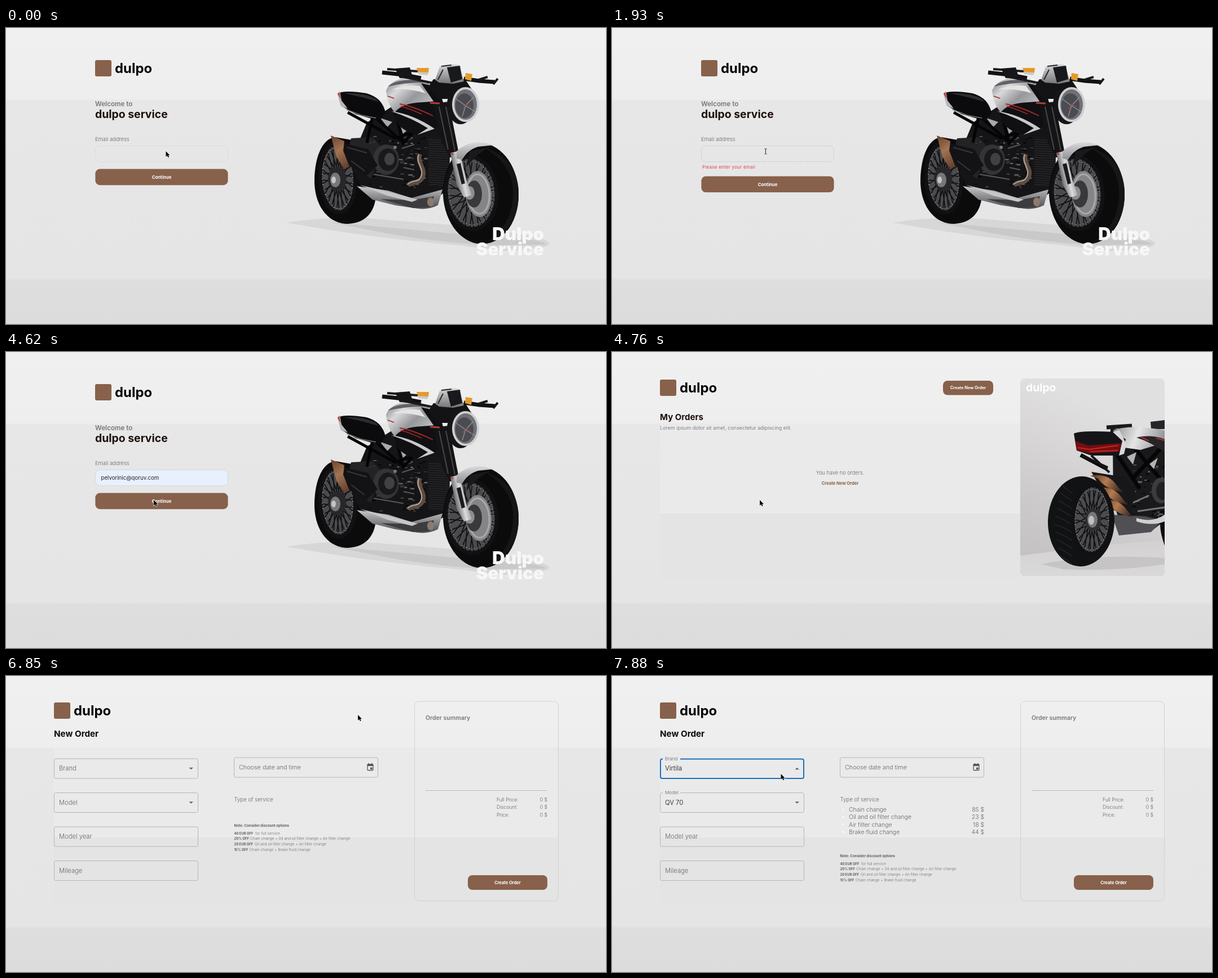
An HTML page with a canvas that plays this animation: 1064x526 px, repeating every 8 s.

```html
<!DOCTYPE html>
<html lang="en">
<head>
<meta charset="utf-8">
<title>Service booking</title>
<style>
  html, body { margin: 0; width: 100%; height: 100%; overflow: hidden; background: #e6e6e6; }
  canvas { display: block; }
</style>
</head>
<body>
<canvas id="stage" width="1064" height="526"></canvas>
<script>
const ctx = document.getElementById('stage').getContext('2d');
const LOOP = 8000;
const BROWN = '#87614b';
const BRAND = 'dulpo';
const EMAIL = 'pelvorinic@qoruv.com';

// [time, x, y, shape]
const cursorKeys = [
  [0, 283.5, 219], [150, 285, 234], [300, 287, 254], [450, 288, 264],
  [1200, 300, 228], [1350, 308, 187], [1640, 295, 192], [1790, 283, 197],
  [1930, 272.5, 219, 'beam'], [3280, 262, 240], [3430, 257, 251],
  [4170, 259, 258], [4320, 262, 263], [5350, 343, 216], [5500, 385, 207],
  [5650, 421, 199], [5800, 518, 150], [5950, 575, 108], [6100, 604, 84],
  [6250, 615, 75], [6400, 624, 69], [7150, 515, 207], [7290, 400, 188],
  [7440, 299.5, 174]
];
const latest = (keys, t) => keys.filter(k => k[0] <= t).pop();

// Drawing helpers
function fill(color, d) {
  ctx.fillStyle = color;
  ctx.fill(new Path2D(d));
}
function line(color, width, d) {
  ctx.strokeStyle = color;
  ctx.lineWidth = width;
  ctx.stroke(new Path2D(d));
}
function oval(color, x, y, rx, ry = rx, turn = 0, width = 0) {
  ctx.beginPath();
  ctx.ellipse(x, y, rx, ry, turn, 0, Math.PI * 2);
  ctx.fillStyle = ctx.strokeStyle = color;
  ctx.lineWidth = width;
  width ? ctx.stroke() : ctx.fill();
}
function box(x, y, w, h, r, color, stroke, width = 1) {
  ctx.beginPath();
  ctx.roundRect(x, y, w, h, r);
  if (color) { ctx.fillStyle = color; ctx.fill(); }
  if (stroke) { ctx.strokeStyle = stroke; ctx.lineWidth = width; ctx.stroke(); }
}
function text(s, x, y, size, weight = 300, color = '#646464', align = 'left', spacing = 0) {
  ctx.font = `${weight} ${size}px Inter, "Open Sans", sans-serif`;
  ctx.letterSpacing = spacing + 'px';
  ctx.textAlign = align;
  ctx.fillStyle = color;
  ctx.fillText(s, x, y);
}
function shade(x0, y0, x1, y1, ...stops) {
  const g = ctx.createLinearGradient(x0, y0, x1, y1);
  stops.forEach(([at, color]) => g.addColorStop(at, color));
  return g;
}
function button(label, x, y, w, h, size) {
  box(x, y, w, h, 8, BROWN);
  text(label, x + w / 2, y + h / 2 + size * .36, size, 700, '#fff', 'center');
}
// Dark rim with crossed spokes and a ring of bright nipples
function rim(x, y, rx, ry, turn) {
  oval('#4b4b4d', x, y, rx, ry, turn);
  ctx.save();
  ctx.translate(x, y);
  ctx.rotate(turn);
  const count = 36;
  ctx.beginPath();
  for (let i = 0; i < count; i++) {
    const a = i / count * Math.PI * 2, b = a + (i % 2 ? .6 : -.6);
    ctx.moveTo(Math.cos(b) * rx * .2, Math.sin(b) * ry * .2);
    ctx.lineTo(Math.cos(a) * rx, Math.sin(a) * ry);
  }
  ctx.strokeStyle = '#111113';
  ctx.lineWidth = 1.8;
  ctx.stroke();
  oval('#111113', 0, 0, rx, ry, 0, 7);
  for (let i = 0; i < count; i++) {
    const a = i / count * Math.PI * 2;
    oval('#a5a5a7', Math.cos(a) * rx * .87, Math.sin(a) * ry * .89, .9);
  }
  ctx.restore();
}
// Seeded glints of metal
function glints(x, y, w, h, count) {
  let seed = 7;
  const random = () => (seed = seed * 16807 % 2147483647) / 2147483647;
  for (let i = 0; i < count; i++) {
    ctx.fillStyle = ['#050506', '#3f3f42', '#67676a'][i % 3];
    ctx.fillRect(x + random() * w, y + random() * h, 2 + random() * 6, 1 + random() * 2);
  }
}

function backdrop() {
  ctx.fillStyle = shade(0, 0, 0, 526, [0, '#f0f0f0'], [.239, '#eeeeee'], [.246, '#e7e7e7'],
    [.845, '#e5e5e5'], [.852, '#dedede'], [1, '#dcdcdc']);
  ctx.fillRect(0, 0, 1064, 526);
}
function panelTint(right) {
  ctx.fillStyle = '#eaeaea';
  ctx.fillRect(85, 129, right - 85, 158);
  ctx.fillStyle = '#e4e4e4';
  ctx.fillRect(85, 287, right - 85, 117);
}
function header(x, y) {
  box(x, y, 29, 29, 3, BROWN);
  text(BRAND, x + 35, y + 22.5, 23.9, 700, '#050505');
}

function sideBike() {
  fill('#d7d7d7', 'M498 346 Q560 335 640 338 L790 350 Q960 368 964 383 Q955 396 880 396 L800 386 Q640 372 498 346Z');
  fill('#c9c9ca', 'M575 345 L780 364 L900 374 Q960 378 956 385 L850 386 Q740 378 660 362Z');

  // Rear wheel
  fill('#0b0b0c', 'M584 194 C559 196 546 235 547 276 C549 322 576 349 607 348 C642 346 655 322 656 296 L648 205Z');
  rim(588, 267, 31, 61, -.06);
  oval('#27272a', 587, 268, 16, 21);
  oval('#77777a', 584, 270, 9, 13);
  oval('#c4c4c6', 581, 270, 4, 6);

  // Frame, engine and radiator
  fill('#151517', 'M640 168 L690 136 L764 128 L787 190 L786 286 L758 306 L690 302 L628 280 L610 240Z');
  fill('#232325', 'M612 196 L650 194 L664 210 L648 268 L600 240Z');
  glints(644, 192, 98, 92, 90);
  fill('#a9a9ab', 'M664 160 L685 167 L676 176Z M699 172 L711 182 L704 188Z M728 180 L740 172 L738 184Z');
  line('#050506', 5, 'M606 150 L690 196 L764 170 M650 157 L640 204 M690 148 L704 205 L748 158 M700 200 L656 160');
  oval('#343437', 674, 234, 23, 27);
  oval('#19191b', 677, 234, 17, 20);
  oval('#414145', 680, 233, 9, 11);
  oval('#87878a', 652, 240, 3);
  oval('#77777a', 690, 212, 3);
  line('#58585b', 2, 'M652 260 L705 269 M702 214 L724 207 M705 248 L724 252 M640 248 L655 236');
  fill('#161618', 'M746 192 L788 190 L785 286 L752 282Z');
  ctx.beginPath();
  for (let y = 198; y < 280; y += 4) { ctx.moveTo(749, y); ctx.lineTo(785, y + 2); }
  ctx.strokeStyle = '#303033'; ctx.lineWidth = 1; ctx.stroke();
  line('#5d4c40', 8, 'M734 224 C727 240 748 252 737 268 C732 277 721 270 713 280');
  line('#b5a79c', 2, 'M732 225 C725 240 745 252 734 267 C731 274 720 270 712 278');

  // Exhaust and belly pan
  fill('#131315', 'M594 204 L642 215 L659 244 L638 264 L604 242Z');
  line('#37373a', 2, 'M605 212 L640 222 M612 236 L636 254');
  fill(shade(576, 192, 612, 246, [0, '#68422d'], [.45, '#a37353'], [1, '#5c3c2b']),
    'M576 191 L600 201 L598 218 L609 246 L600 251 L586 229Z');
  fill(shade(0, 278, 0, 323, [0, '#d4d4d6'], [.4, '#97979a'], [1, '#48484b']),
    'M622 281 L678 289 L719 302 L774 287 L766 315 Q750 323 731 321 L690 315 L650 305Z');
  fill('#3c3c3f', 'M664 304 L720 306 L759 299 L753 318 L722 320Z');
  fill('#c6c6c8', 'M628 279 L690 294 L730 305 L720 309 L676 298Z');
  oval('#8b7a6e', 753, 309, 6, 8);

  // Seat and tail
  fill('#0b0b0d', 'M588 116 Q602 110 639 116 Q668 124 673 151 L662 165 L620 153 L594 138Z');
  fill('#2d2d30', 'M600 116 Q633 114 656 126 L660 131 Q630 122 600 116Z');
  fill('#b8b8bb', 'M588 117 L592 112 L595 129 L606 143 L594 139Z');
  line('#77777b', 1.5, 'M604 145 L630 155 L656 160');
  fill('#bd403b', 'M588 117 L591 114 L594 127Z');

  // Tank and side panels
  fill(shade(676, 90, 738, 158, [0, '#77787c'], [.3, '#d9d9db'], [.6, '#96979b'], [1, '#c6c6c9']),
    'M674 111 Q682 92 711 89 L748 94 L768 130 L735 140 L700 152 L689 150 Q675 133 674 111Z');
  fill('#606166', 'M677 104 Q690 92 722 92 L745 97 Q712 96 677 104Z');
  fill('#e4e4e5', 'M684 110 Q706 99 734 103 L744 116 Q710 106 684 110Z');
  fill('#101013', 'M690 149 Q704 133 738 132 L764 130 L772 172 L734 190 Q706 187 690 165Z');
  fill('#101013', 'M736 98 L768 106 L777 140 L758 130Z');
  line('#a42929', 1.8, 'M698 135 Q722 139 757 156 M700 139 Q715 143 737 153 M677 121 L688 125');
  fill('#c9c9cc', 'M683 148 Q722 153 760 179 L729 190 L748 178 Q720 160 683 148Z');

  // Handlebar, lamps and screen
  line('#121214', 7, 'M667 79 L704 83 L736 89 M812 90 L839 94 L867 96');
  line('#19191b', 4, 'M676 73 L730 77 M700 86 L758 98 L805 102 M838 92 L854 87 M864 100 L872 90');
  fill('#161618', 'M690 72 L716 70 L722 90 L698 89Z');
  fill('#e39a2b', 'M728 71 L750 71 L749 80 L731 80Z M815 80 L827 82 L825 94 L814 91Z');
  fill('#c9c9cb', 'M730 78 L749 79 L747 84 L731 82Z');
  fill('#131315', 'M758 91 L814 91 L828 112 L814 126 L766 126 L748 106Z');
  fill(shade(0, 65, 0, 98, [0, '#d4d4d6'], [1, '#77777b']), 'M761 92 L769 69 Q785 62 804 66 L812 95 L793 99 L768 97Z');
  fill('#18191c', 'M782 70 L805 67 L809 91 L789 97Z');
  line('#28282b', 2, 'M766 92 L775 74 M790 66 L772 68');

  // Front wheel, fork and fender
  oval('#0b0b0c', 842, 294, 67, 90, -.05);
  fill('#161618', 'M847 212 Q903 245 899 301 Q895 356 850 382 Q911 360 909 289 Q905 229 847 212Z');
  rim(825, 293, 45, 64, -.08);
  oval('#858588', 838, 295, 23, 41, -.08);
  oval('#a9a9ac', 838, 295, 19, 35, -.08, 3);
  oval('#39393c', 830, 295, 14, 24);
  oval('#8d8d90', 822, 293, 9, 12);
  oval('#c3c3c5', 817, 293, 5, 7);
  fill('#141416', 'M757 134 L785 131 L804 228 L787 230 L773 204Z');
  line('#48484c', 2, 'M768 140 L784 216 M780 140 L796 218');
  fill(shade(790, 240, 816, 234, [0, '#68686b'], [.5, '#dcdcde'], [1, '#909094']),
    'M788 222 L804 218 L817 272 L826 297 L812 301 L799 278Z');
  fill('#1b1b1d', 'M799 242 L806 240 L814 276 L808 278Z');
  fill(shade(0, 202, 0, 237, [0, '#dcdcde'], [1, '#88888c']),
    'M799 219 Q818 202 841 203 L866 208 L837 211 Q818 217 809 234 L799 232Z');
  fill('#19191b', 'M822 219 L862 211 Q839 218 816 247Z');
  line('#b13e37', 3, 'M752 133 L769 134 M789 222 L793 225');

  // Headlight
  oval('#151517', 806, 137, 24, 34);
  oval('#cfcfd1', 815, 136, 24, 31);
  oval('#707176', 815, 136, 20, 27);
  oval('#4b4c51', 813, 138, 16, 22);
  line('#8f9094', 1.4, 'M798 126 L815 138 L829 123 M815 138 L809 157 M815 138 L832 149');
  line('#a4453f', 1.2, 'M809 144 L816 136 L824 140');
}

function rearBike() {
  ctx.save();
  box(724, 47, 256, 351, 8, shade(742, 360, 865, 95, [0, '#c4c2c2'], [.32, '#cccaca'], [.65, '#d7d5d5'], [1, '#e1e0e0']));
  ctx.clip();
  fill(shade(0, 335, 0, 398, [0, '#d3d1d1'], [1, '#dad9d9']), 'M724 362 L870 343 L980 335 V398 H724Z');
  fill('#c6c4c4', 'M760 377 Q850 358 980 366 V377 Q900 390 800 386Z');

  // Frame, engine and far wheel
  fill('#0d0d0e', 'M980 278 Q964 300 980 344Z');
  fill('#19191b', 'M888 158 L980 149 V300 L958 317 L907 318 L889 269Z');
  glints(920, 200, 60, 95, 60);
  line('#060607', 7, 'M831 183 L878 208 M890 174 L936 243 M980 164 L923 225 M926 170 L980 235');
  fill('#b4b2b2', 'M913 186 L930 178 L924 200Z M953 199 L968 188 L961 208Z');
  oval('#3c3c3f', 974, 246, 17, 23);
  oval('#202022', 976, 247, 11, 16);
  line('#77777a', 3, 'M919 270 L952 255 M932 283 L980 276');
  fill('#505054', 'M886 289 L945 292 L976 299 L956 320 L899 326Z');
  fill('#d0d0d2', 'M930 295 Q960 304 980 289 L980 301 Q958 310 930 301Z');

  // Seat, tank and tail light
  line('#19191b', 7, 'M877 134 L922 131 M884 139 L929 145');
  fill('#25262a', 'M955 124 L980 121 V137 H956Z');
  fill(shade(895, 133, 975, 165, [0, '#9a9a9d'], [.45, '#e6e6e7'], [1, '#929296']),
    'M889 139 Q918 128 980 139 V161 L937 174 L902 169Z');
  fill('#252528', 'M930 152 Q955 146 980 155 V178 Q955 160 930 152Z');
  line('#b42f30', 2, 'M965 153 L980 157 M938 151 L952 158');
  fill('#151518', 'M819 145 Q831 139 887 142 L911 155 L902 184 L850 184 L824 175Z');
  fill('#d7d7d9', 'M888 142 L900 139 L912 164 L908 181 L899 184 L905 158Z');
  fill('#740d12', 'M822 158 L844 166 L904 162 L899 177 L846 180 L824 174Z');
  line('#c42823', 2, 'M826 170 L847 173 L898 166 M848 177 L897 175');
  line('#141416', 4, 'M832 184 L879 205 M850 184 L882 214');

  // Exhausts
  fill('#17171a', 'M850 213 L907 222 L928 247 L919 292 L887 280Z');
  for (let i = 0; i < 3; i++) {
    ctx.save();
    ctx.translate(i * 9, i * 22);
    fill(shade(850, 218, 900, 247, [0, '#573620'], [.5, '#b57b51'], [1, '#3e2a22']),
      'M848 220 Q880 214 895 237 L906 249 Q877 246 862 225Z');
    ctx.restore();
  }

  // Rear wheel
  oval('#111214', 832, 301, 59, 80, .03);
  ctx.beginPath();
  for (let i = 0; i < 10; i++) {
    const y = 236 + i * 14;
    ctx.moveTo(783 + Math.abs(i - 5) * 3, y);
    ctx.quadraticCurveTo(800, y + 4, 816, y + 15);
  }
  ctx.strokeStyle = '#202123'; ctx.lineWidth = 2; ctx.stroke();
  rim(851, 298, 34, 61, .04);
  oval('#2f2f32', 853, 298, 14, 20);
  oval('#77777b', 852, 298, 9, 14);
  oval('#c0c0c4', 850, 299, 5, 8);
  ctx.restore();
  text(BRAND, 734, 70, 19.3, 700, '#fff');
}

function popup() {
  ctx.save();
  ctx.shadowColor = 'rgba(0,0,0,.35)';
  ctx.shadowBlur = 4;
  ctx.shadowOffsetY = 1;
  box(222, 244, 107, 56.5, 2, '#fff');
  ctx.restore();
  fill('#fff', 'M230 244.5 L235.5 239 L241 244.5Z');
  line('#dedede', 1, 'M222 271.5 H329');
  text(EMAIL, 229, 261, 8.2, 400, '#222');
  oval('#5f6368', 235, 286.5, 4.6);
  text('Manage...', 247, 290, 8.4, 400, '#5a5a5a');
}

function welcome(t) {
  const error = t >= 900 && t < 3720;
  const filled = t >= 3720;
  const focused = t >= 2230 && t < 4620;
  const caret = focused && !(t >= 2830 && t < 3280) && t < 4320;

  header(158, 57);
  text('Welcome to', 158, 139, 11.6, 600, '#777');
  text(BRAND + ' service', 158, 160, 19.4, 700, '#1d100d');
  text('Email address', 158, 201, 9.4);
  const hover = t >= 1930 ? '#d2d2d2' : '#dcdcdc';
  if (focused) box(159, 210, 234, 27, 7, filled ? '#e8f0fe' : '#e8e8e8', '#1260b8', 2);
  else box(158.5, 209.5, 235, 28, 8, filled ? '#e8f0fe' : null, filled ? '#d3d8e2' : hover);
  if (filled) text(EMAIL, 168.5, 227, 9.7, 400, '#222');
  if (caret) {
    ctx.fillStyle = '#111';
    ctx.fillRect(filled ? 272 : 168.5, 216, 1, 15);
  }
  if (error) text('Please enter your email', 160, 249.5, 7.8, 400, '#e04040', 'left', .35);
  button('Continue', 158.4, error ? 263.4 : 250.6, 235.2, 28.6, 7.8);

  sideBike();
  text('Dulpo', 954, 377, 31.2, 900, '#f7f7f7', 'right');
  text('Service', 954, 404, 31.2, 900, '#f7f7f7', 'right');
  if (t >= 2380 && !filled) popup();
}

function orders() {
  panelTint(724);
  header(85, 49);
  button('Create New Order', 587, 51, 89, 25.5, 7.3);
  text('My Orders', 85, 120.5, 15, 700, '#1d100d');
  text('Lorem ipsum dolor sit amet, consectetur adipiscing elit.', 85, 138, 9.15);
  text('You have no orders.', 404.5, 217.5, 9.2, 300, '#646464', 'center');
  text('Create New Order', 404.5, 236, 7.5, 700, BROWN, 'center');
  rearBike();
}

function field(label, y, { value, focus, select } = {}) {
  const small = value || focus;
  if (focus) box(86, y + .5, 254, 34.5, 3, null, '#1a6fbd', 2);
  else box(85.5, y, 255, 35, 3, null, '#b5b5b5');
  if (small) {
    ctx.fillStyle = '#eaeaea';
    ctx.fillRect(90, y - 2, 31, 5);
    text(label, 94, y + 2.7, 8.2);
  } else text(label, 94, y + 21, 11.2);
  if (value) text(value, 94, y + 21, 11.2, 400, '#3b3b3b');
  if (select) {
    const m = y + 17.5, d = focus ? -1.8 : 1.8;
    fill('#666', `M324.5 ${m - d} H332 L328.2 ${m + d}Z`);
  }
}

function newOrder(t) {
  const open = t >= 7580, chosen = t >= 7730;
  panelTint(980);
  header(85, 47);
  text('New Order', 85, 108, 15.2, 700, '#0b0909');
  field('Brand', 147, { select: true, focus: open, value: chosen && 'Virtila' });
  field('Model', 207.5, { select: true, value: chosen && 'QV 70' });
  field('Model year', 268);
  field('Mileage', 328.5);

  box(404.5, 145, 255, 35, 3, null, '#b5b5b5');
  text('Choose date and time', 413, 165.5, 10.8);
  box(641, 157, 10, 10.5, 1, null, '#555', 1.3);
  fill('#555', 'M641 156.5 H651 V160 H641Z M642.5 155 H644 V158 H642.5Z M648 155 H649.5 V158 H648Z M646 162.5 H649.5 V166 H646Z');

  text('Type of service', 404.5, 222.5, 9.65);
  if (chosen) {
    [['Chain change', 85], ['Oil and oil filter change', 23], ['Air filter change', 18], ['Brake fluid change', 44]]
      .forEach(([name, price], i) => {
        const y = 241 + i * 13.4;
        oval('#f5f5f5', 410, y - 4, 2.8);
        oval('#dedede', 410, y - 4, 2.8, 2.8, 0, .6);
        text(name, 420, y, 10.4);
        text(price + ' $', 660, y, 10.4, 300, '#646464', 'right');
      });
  }

  const note = chosen ? 322 : 268;
  text('Note: Consider discount options', 404.5, note, 6.2, 700, '#5e5e5e');
  [['40 EUR OFF', 'for full service', 442],
   ['20% OFF', 'Chain change + Oil and oil filter change + Air filter change', 433],
   ['20 EUR OFF', 'Oil and oil filter change + Air filter change', 441],
   ['15% OFF', 'Chain change + Brake fluid change', 432]].forEach(([deal, terms, x], i) => {
    const y = note + 13.8 + i * 9.6;
    text(deal, 404.5, y, 5.9, 700, '#5e5e5e');
    text(terms, x, y, 6.6, 300, '#6c6c6c');
  });

  box(724.5, 45, 255, 354.5, 8, null, '#d1d1d1');
  text('Order summary', 744, 77.5, 10.5, 600, '#777');
  line('#b9b9b9', 1, 'M744 203.5 H960');
  ['Full Price:', 'Discount:', 'Price:'].forEach((name, i) => {
    const y = 223 + i * 13.4;
    text(name, 870, y, 8.6);
    text('0 $', 960, y, 8.6, 300, '#646464', 'right');
  });
  button('Create Order', 819, 354, 141, 26, 7.4);
}

function cursor(t) {
  const [, x, y, kind] = latest(cursorKeys, t);
  ctx.save();
  ctx.translate(x, y);
  if (kind === 'beam') {
    line('#222', 1, 'M-2 -4.5 Q0 -4.5 0 -3 Q0 -4.5 2 -4.5 M0 -3 V3.5 M-2 5 Q0 5 0 3.5 Q0 5 2 5');
  } else {
    const arrow = 'M0 0 V10 L2.3 7.8 L4 11.3 L5.7 10.5 L4.1 7.2 H7.2Z';
    line('rgba(255,255,255,.85)', 1.3, arrow);
    fill('#050505', arrow);
  }
  ctx.restore();
}

function frame(now) {
  const t = now % LOOP;
  backdrop();
  if (t < 4760) welcome(t);
  else if (t < 6850) orders();
  else newOrder(t);
  cursor(t);
}

let start;
function tick(now) {
  start ??= now;
  frame(now - start);
  requestAnimationFrame(tick);
}
requestAnimationFrame(tick);
</script>
</body>
</html>
```
